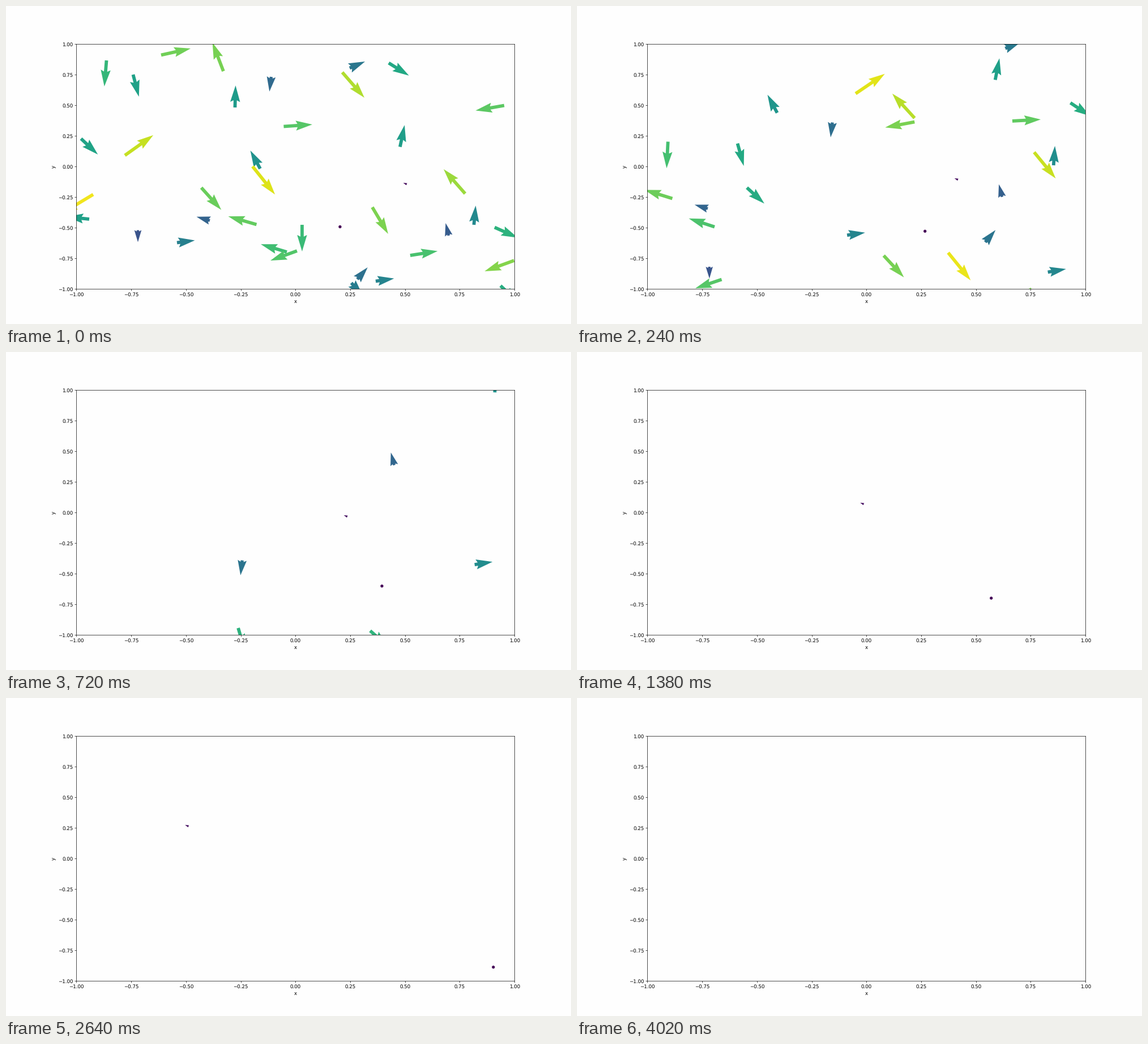
A matplotlib script that plays this animation: 998x561 px, repeating every 8 s.

```python
import numpy as np
import matplotlib.pyplot as plt
from matplotlib.animation import FuncAnimation

W, H, DPI = 998, 561, 62.375
TICK, STEP, LOOP = 20, 60, 8000   # ms
UNIT = 240                        # ms, the time unit of all speeds
PX_PER_SPEED = 70                 # arrow length in pixels
PULL, FADE = 0.06, 2.5            # attraction to the centre and its decay

plt.rcParams["text.hinting"] = "none"
fig, ax = plt.subplots(figsize=(W / DPI, H / DPI), dpi=DPI, facecolor="#fefefe")
fig.subplots_adjust(left=0.1246)
ax.set_facecolor("#fefefe")
ax.set(xlim=(-1, 1), ylim=(-1, 1), xlabel="x", ylabel="y")
ax.set_xticks(np.linspace(-1, 1, 9))
ax.set_yticks(np.linspace(-1, 1, 9))

left, bottom, right, top = ax.get_position().extents * [W, H, W, H]

# Start in pixels and heading in degrees, from slowest to fastest
starts = np.array([
    (590, 389.5, -29.6), (708, 314.5, 157.7), (233, 395.5, -90),
    (782, 405, 104), (360, 378.5, 164), (468.5, 125, -97),
    (620.5, 482, 48.8), (607, 109.5, 23), (610, 488.5, -48),
    (302, 417.5, 7.3), (653, 485.5, 8.4), (826.5, 386, 84.7),
    (449, 287, 118.5), (404.5, 179, 88.5), (696, 248.5, 78.2),
    (147, 376, 174), (224.5, 121, -75.3), (132.5, 234, -43.2),
    (676, 100.5, -31.9), (873.5, 493.5, -43), (863, 390.5, -24),
    (177.5, 96, -94.7), (523, 386, -90), (496, 434, 163.3),
    (714, 440, 9), (514, 432, 200), (490.5, 212.5, 3.9),
    (880, 175.5, 190), (442.5, 385.5, 163.9), (345, 320.5, -48),
    (274, 86.5, 12.5), (384, 115, 111), (647, 355, -59.2),
    (897.5, 449, 200), (811, 331, 131.4), (594, 117, -48.9),
    (210, 263.5, 35.4), (435.5, 283, -51.3), (154, 332.5, 211),
])

# Arrow length rises with rank
rank = np.arange(len(starts))
length = np.interp(rank, [0, 1, 2, 7, 11, 13, 17, 21, 25, 33, 38],
                   [5.14, 6.82, 21, 29.5, 34, 38.8, 40.8, 46, 49.9, 55.4, 65.5])


def simulate(steps, dt):
    """Positions and velocities of all arrows at every step."""
    x, y, heading = starts.T
    angle = np.radians(heading)
    p = np.stack([2 * (x - left) / (right - left) - 1,
                  2 * (H - y - bottom) / (top - bottom) - 1], 1)
    speed = length[:, None] / PX_PER_SPEED
    v = speed * np.stack([np.cos(angle), np.sin(angle)], 1)
    pos, vel = [], []
    for k in range(steps):
        pos.append(p)
        vel.append(v)
        acc = -PULL * np.exp(-k * dt / FADE) * speed ** 2 * p
        p = p + (v + acc * dt / 2) * dt
        v = v + acc * dt
    return np.array(pos), np.array(vel)


steps = LOOP // STEP + 1
pos, vel = simulate(steps, STEP / UNIT)

# Arrows never come back once their tail has left the axes
alive = np.logical_and.accumulate(np.abs(pos).max(-1) < 1, axis=0)
pos[~alive] = 9
vel[~alive] = 0.1

# Colours brighten a little at first
glow = 1 + 0.03 * np.minimum(np.arange(steps) * STEP / UNIT, 3)
shade = np.hypot(vel[..., 0], vel[..., 1]) * glow[:, None]

arrows = ax.quiver(*pos[0].T, *vel[0].T, shade[0], cmap="viridis",
                   clim=(0.072, 0.954), width=0.0075,
                   scale=(right - left) / PX_PER_SPEED)


def update(n):
    k = n * TICK // STEP
    arrows.set_offsets(pos[k])
    arrows.set_UVC(*vel[k].T, shade[k])
    return arrows,


anim = FuncAnimation(fig, update, frames=LOOP // TICK, interval=TICK,
                     repeat=True, repeat_delay=0)
plt.show()
```
